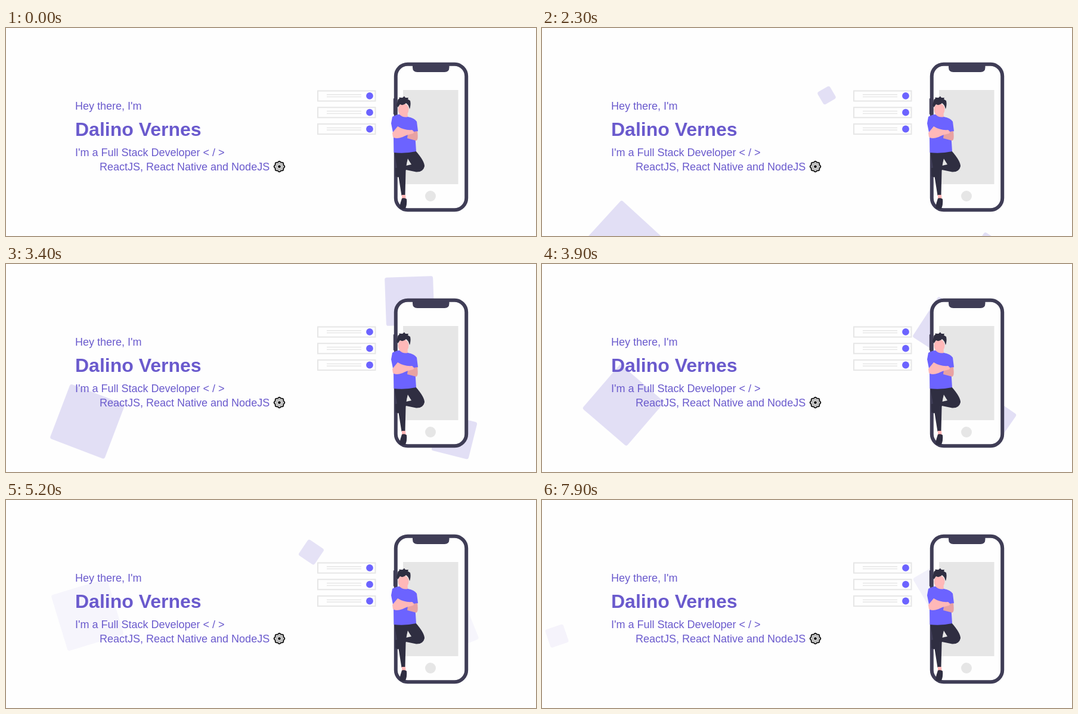
Animation, 889 px wide and 349 px high, one loop 8000 ms. Source, as an HTML page:

```html
<!DOCTYPE html>
<html lang="en">
<head>
<meta charset="utf-8">
<title>Developer banner</title>
<style>
  html, body { margin: 0; width: 100%; height: 100%; overflow: hidden; background: #fefefe; }
  svg { display: block; width: 100%; height: 100%; }
  text { font: 18px "Liberation Sans", Arial, sans-serif; fill: #6a5acd; }
  .name { font-size: 32px; font-weight: bold; }
  .grey { fill: #e6e6e6; }
  .dark { fill: #3f3d56; }
  .ink { fill: #2f2e41; }
  .skin { fill: #ffb8b8; }
  .violet { fill: #6c63ff; }
</style>
</head>
<body>
<svg viewBox="0 0 889 349">
  <defs>
    <g id="card">
      <rect x="523" y="105.5" width="96.5" height="17" fill="#fefefe" stroke="#e6e6e6" stroke-width="2"/>
      <path d="M538 111.8H596M538 115.6H596" stroke="#e6e6e6" stroke-width="1.5"/>
      <circle class="violet" cx="610" cy="113.9" r="5.9"/>
    </g>
  </defs>

  <g id="squares" fill="#6a5acd"></g>

  <text x="116" y="137">Hey there, I'm</text>
  <text class="name" x="116" y="181">Dalino Vernes</text>
  <text x="116" y="215">I'm a Full Stack Developer &lt; / &gt;</text>
  <text x="157" y="239">ReactJS, React Native and NodeJS</text>

  <g transform="translate(458.5 232.5)" fill="none">
    <polygon id="gear" fill="#d4d4d4" stroke="#111" stroke-width="1.8"/>
    <circle r="5" stroke="#999"/>
    <circle r="2.3" fill="#111"/>
  </g>

  <use href="#card"/>
  <use href="#card" y="27.8"/>
  <use href="#card" y="55.6"/>

  <!-- phone -->
  <rect class="dark" x="649.8" y="118" width="4" height="27" rx="1"/>
  <rect x="653.8" y="60.8" width="118.4" height="244.4" rx="20" fill="#fefefe" stroke="#3f3d56" stroke-width="6"/>
  <path class="dark" d="M682 60H743.5V66Q743.5 74 735.5 74H690Q682 74 682 66Z"/>
  <rect class="grey" x="666" y="104" width="92.5" height="158"/>
  <circle class="grey" cx="712" cy="282" r="9"/>

  <!-- person -->
  <path class="ink" d="M670 208L687 206Q702 223 702 232Q700 242 688 241.500L671 238L658 250.500L653.500 249L653 235L680 229L672 216Z"/>
  <path class="ink" d="M651 206L677 208Q671 228 670.500 240L669.500 281H663.500L657 240Z"/>
  <path class="skin" d="M664 280H670L671 288H664Z"/>
  <path class="ink" d="M664 286Q668 284 672 287Q673 296 670 303Q664 305 660 302Q661 294 664 286Z"/>
  <path class="skin" d="M659 136L660 147Q666 154 674 149L673 139Z"/>
  <path class="violet" d="M648 149Q655 145 660 145Q666 151 674 149Q685 151 689 157L691 173L686 176L688 207Q670 211 650.500 209L650 180L646 160Z"/>
  <path fill="#e8a2a2" d="M684 174L690 173Q692 188 688 189L673 185L674 178Z"/>
  <path class="skin" d="M648 176L657 165Q668 172 681 171Q686 174 683 177Q672 179 665 183Q654 187 649 183Z"/>
  <ellipse class="skin" cx="666.500" cy="137" rx="9" ry="10.500"/>
  <path class="ink" d="M655 130L657.500 120L660 118L659 116.500L665 117L668 114.500L670 117L675 117L674 119.500L678 122Q679.500 129 677 136Q675 128 671 126Q666 131 661 128L657.500 133Z"/>
</svg>

<script>
const SVG = "http://www.w3.org/2000/svg";
const LOOP = 8, STEP = .1;        // seconds
const OPACITY = .19;
const SPIN = .73;                 // degrees per pixel travelled
const FADE = .7;                  // fading time as a share of the glide

// Each square passes height y with the given angle at time "at" and glides to a
// rest "left" pixels further on, slowing with time constant "glide"; it has faded
// out at "gone". One with "turn" then retraces its path: t looks like turn - t.
const squares = [
  { x: 477.5, y: 113, size: 24, angle: 60, at: 2.3, left: 43.5, glide: .9, gone: 2.9, turn: 8.18 },
  { x: 136.5, y: 292, size: 98, angle: .5, at: 3, left: -143, glide: 1.85, gone: 5.55 },
  { x: 677, y: 110, size: 81, angle: 33, at: 3.9, left: 113.6, glide: 1.42, gone: 4.9, turn: 12.35 },
  { x: 752, y: 318, size: 64, angle: -7, at: 3, left: -148, glide: 1.85, gone: 5.55 },
  { x: 512, y: 87.5, size: 32, angle: 34, at: 5.2, left: 98, glide: 1.2, gone: 5.95 },
  { x: 25, y: 291.5, size: 32, angle: 25, at: 6.4, left: -120, glide: 2, gone: 8.36 }
];

const layer = document.getElementById("squares");
for (const s of squares) {
  s.node = document.createElementNS(SVG, "rect");
  const box = { x: -s.size / 2, y: -s.size / 2, width: s.size, height: s.size, rx: 3.5 };
  for (const key in box) s.node.setAttribute(key, box[key]);
  layer.append(s.node);
}

const gearPoints = Array.from({ length: 64 }, (_, i) => {
  const a = i * Math.PI / 32, r = 8.2 + .7 * Math.cos(8 * a);
  return [r * Math.cos(a), r * Math.sin(a)];
});
document.getElementById("gear").setAttribute("points", gearPoints.join(" "));

function draw(t) {
  for (const s of squares) {
    const time = s.turn && t > s.turn / 2 ? s.turn - t : t;
    const moved = s.left * (1 - Math.exp((s.at - time) / s.glide));
    const angle = s.angle + SPIN * moved * Math.sign(s.left);
    const visible = (s.gone - time) / (FADE * s.glide);
    s.node.setAttribute("transform", `translate(${s.x} ${s.y + moved}) rotate(${angle})`);
    s.node.setAttribute("opacity", OPACITY * Math.max(0, Math.min(1, visible)));
  }
}

const start = performance.now();
function tick() {
  const t = (performance.now() - start) / 1000 % LOOP;
  draw(Math.floor(t / STEP) * STEP);
  requestAnimationFrame(tick);
}
tick();
</script>
</body>
</html>
```
